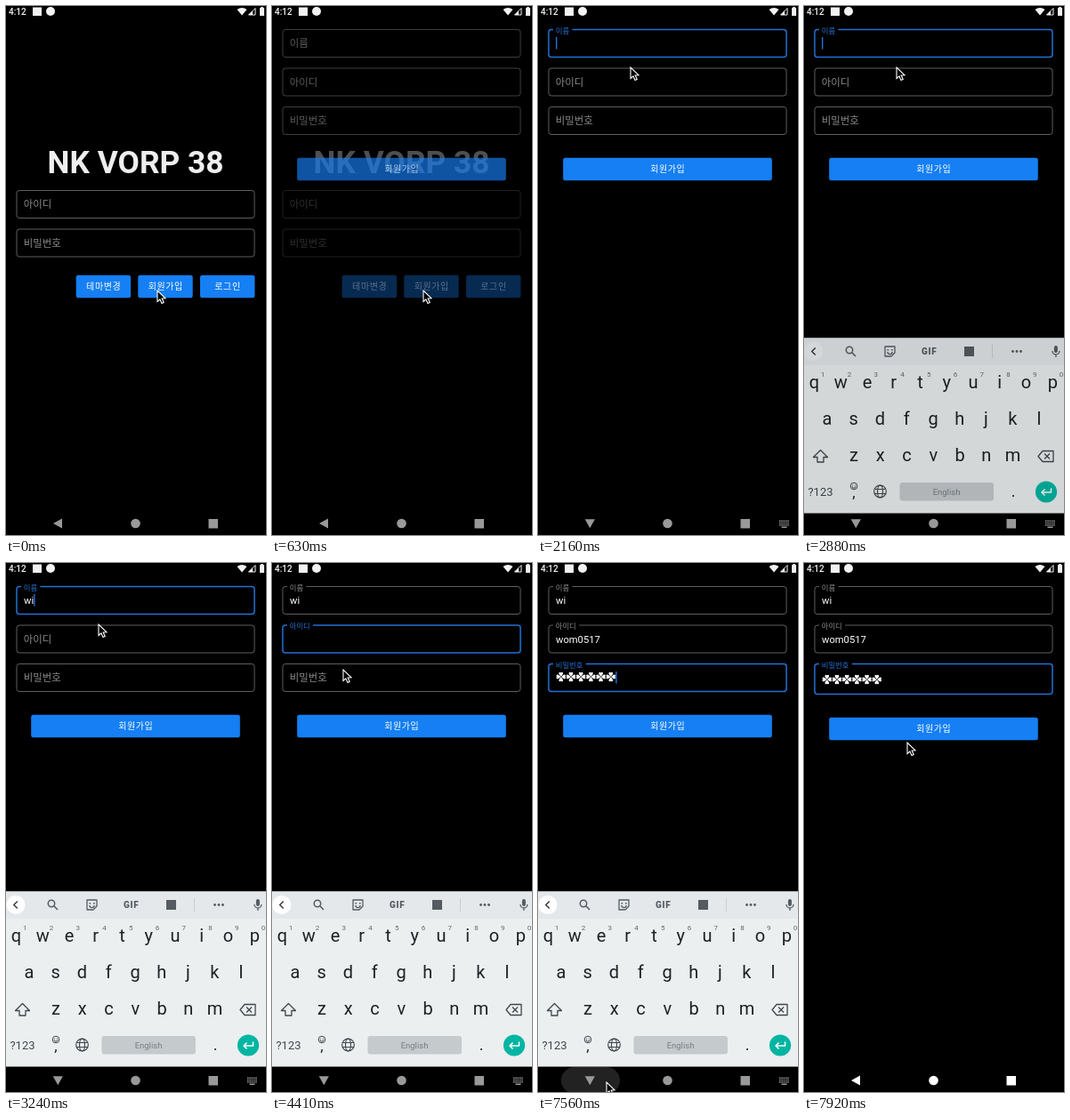
An HTML page with a canvas for the animation above (8000 ms loop, 292 by 595 pixels).

```html
<!DOCTYPE html>
<html lang="ko">
<head>
<meta charset="utf-8">
<title>Sign up</title>
<style>
html, body { margin: 0; width: 100%; height: 100%; overflow: hidden; background: #000; }
canvas { display: block; width: 292px; height: 595px; }
</style>
</head>
<body>
<canvas id="stage"></canvas>
<script>
const W = 292, H = 595, LOOP = 8000, STEP = 90;
const canvas = document.getElementById('stage');
const ctx = canvas.getContext('2d');
const dpr = window.devicePixelRatio || 1;
canvas.width = W * dpr;
canvas.height = H * dpr;

const FONT = 'Roboto, "Noto Sans CJK KR", "Noto Sans CJK", sans-serif';
const BLUE = '#2470d4', GREY = '#5e5e5e', HINT = '#8a8a8a';
const TITLE = 'NK VORP 38', NAME = 'wi', USER = 'wom0517';

const FOCUS = { name: 1350, user: 3690, pass: 5580 };
const NAME_KEYS = [3060, 3240];
const USER_KEYS = [4770, 4860, 4950, 5130, 5220, 5310, 5400];
const PASS_KEYS = [6390, 6570, 6660, 6840, 6930, 7110];
const CARET_STARTS = [1880, ...NAME_KEYS, 3780, ...USER_KEYS, FOCUS.pass, ...PASS_KEYS];
const KEYS_OPEN = 2880, KEYS_CLOSE = 7650, CLOSED = 7740;

// time, x, y of the pointer tip
const PATH = [
  [0, 170, 320], [630, 170, 320], [1170, 83, 44], [1530, 83, 44],
  [1710, 104, 69], [4050, 104, 69], [4410, 80, 120], [5490, 80, 120],
  [5670, 82, 130], [7200, 82, 130], [7470, 77, 584], [7650, 77, 584],
  [7920, 116, 202]
];

const clamp = v => Math.max(0, Math.min(1, v));
const prog = (t, a, b) => clamp((t - a) / (b - a));
const ease = p => p * p * (3 - 2 * p);
const mix = (a, b, p) => a + (b - a) * p;
const countUntil = (list, t) => list.filter(v => v <= t).length;

function text(str, x, y, size, color, align = 'left', weight = 400, spacing = 0) {
  ctx.font = `${weight} ${size}px ${FONT}`;
  ctx.letterSpacing = spacing + 'px';
  ctx.textAlign = align;
  ctx.fillStyle = color;
  ctx.fillText(str, x, y);
  const w = ctx.measureText(str).width;
  ctx.letterSpacing = '0px';
  return w;
}

function box(x, y, w, h, r) {
  ctx.beginPath();
  ctx.roundRect(x, y, w, h, r);
}

function disc(x, y, r, color) {
  ctx.fillStyle = color;
  ctx.beginPath();
  ctx.arc(x, y, r, 0, Math.PI * 2);
  ctx.fill();
}

function ring(x, y, r, color, width = 1) {
  ctx.strokeStyle = color;
  ctx.lineWidth = width;
  ctx.beginPath();
  ctx.arc(x, y, r, 0, Math.PI * 2);
  ctx.stroke();
}

function shape(points, close = true) {
  ctx.beginPath();
  points.forEach(([x, y], i) => i ? ctx.lineTo(x, y) : ctx.moveTo(x, y));
  if (close) ctx.closePath();
}

function line(points, color, width = 1.3) {
  ctx.strokeStyle = color;
  ctx.lineWidth = width;
  shape(points, false);
  ctx.stroke();
}

function button(label, x, y, w) {
  box(x, y, w, 25.4, 2.5);
  ctx.fillStyle = '#157ff3';
  ctx.fill();
  text(label, x + w / 2 + 0.3, y + 16.3, 10, '#fff', 'center', 500, 0.6);
}

// Outlined input; lift moves the label from the middle onto the border.
function field(label, y, lift = 0, focused = false, h = 31) {
  box(12, y + 0.5, 267, h, 3);
  ctx.strokeStyle = focused ? BLUE : GREY;
  ctx.lineWidth = focused ? 1.5 : 1;
  ctx.stroke();
  const size = mix(11.4, 8.4, lift);
  if (lift > 0) {
    ctx.font = `400 ${size}px ${FONT}`;
    ctx.fillStyle = '#000';
    ctx.fillRect(17, y - 2, (ctx.measureText(label).width + 6) * lift, 5);
  }
  text(label, 19.7, mix(y + 20, y + 4.5, lift), size, focused ? BLUE : HINT);
}

function caret(t, x, y) {
  const start = CARET_STARTS.filter(v => v <= t).pop();
  if (start === undefined || (t - start) % 1000 >= 500) return;
  ctx.fillStyle = BLUE;
  ctx.fillRect(x, y + 9, 1.4, 13.5);
}

function clover(x, y) {
  ctx.fillStyle = '#fff';
  for (let i = 0; i < 4; i++) {
    ctx.save();
    ctx.translate(x, y);
    ctx.rotate(i * Math.PI / 2);
    ctx.beginPath();
    ctx.moveTo(0, -0.2);
    ctx.bezierCurveTo(-0.9, -1.8, -2.8, -2.8, -2.3, -4.5);
    ctx.bezierCurveTo(-1.9, -5.7, -0.5, -5.5, 0, -4.4);
    ctx.bezierCurveTo(0.5, -5.5, 1.9, -5.7, 2.3, -4.5);
    ctx.bezierCurveTo(2.8, -2.8, 0.9, -1.8, 0, -0.2);
    ctx.fill();
    ctx.restore();
  }
}

function statusBar() {
  const c = '#f2f2f2';
  text('4:12', 3, 10, 10, c, 'left', 500);
  ctx.fillStyle = c;
  ctx.fillRect(30, 1.5, 10, 9.5);
  disc(50, 6, 5, c);
  ctx.fillStyle = c;
  ctx.beginPath();
  ctx.moveTo(265, 10.5);
  ctx.lineTo(259.5, 4);
  ctx.quadraticCurveTo(265, 0, 270.5, 4);
  ctx.fill();
  shape([[272.5, 10], [280, 10], [280, 2.5]]);
  ctx.strokeStyle = c;
  ctx.lineWidth = 1;
  ctx.stroke();
  shape([[272.5, 10], [277, 10], [277, 5.5]]);
  ctx.fill();
  ctx.fillRect(285, 2, 5, 9);
  ctx.fillRect(286.3, 1, 2.4, 1);
}

function navBar(t) {
  const c = t >= CLOSED ? '#fff' : '#999';
  const press = prog(t, 7470, 7560) * (1 - prog(t, 7650, 7830));
  if (press > 0) {
    ctx.globalAlpha = press;
    box(26, 567, 66, 30, 15);
    ctx.fillStyle = '#222';
    ctx.fill();
    ctx.globalAlpha = 1;
  }
  const closing = prog(t, KEYS_CLOSE, CLOSED);
  const turn = ease(prog(t, 1800, 2160)) * (1 - closing);
  ctx.save();
  ctx.translate(58.3, 582);
  ctx.rotate(-turn * Math.PI / 2);
  shape([[-5.3, 0], [4.7, -5.6], [4.7, 5.6]]);
  ctx.fillStyle = c;
  ctx.fill();
  ctx.restore();
  disc(145.5, 582, 5.3, c);
  ctx.fillStyle = c;
  ctx.fillRect(227.5, 577, 10.5, 10.5);

  ctx.globalAlpha = prog(t, 1800, 2160) * (1 - closing);
  ctx.fillStyle = '#999';
  for (let r = 0; r < 3; r++)
    for (let i = 0; i < 5; i++) ctx.fillRect(271 + i * 2.3, 578.5 + r * 2.3, 1.5, 1.5);
  ctx.fillRect(273.5, 585.5, 6, 1.5);
  ctx.globalAlpha = 1;
}

function toolbar(glow) {
  const c = '#545c62';
  ctx.fillStyle = '#e4e8eb';
  ctx.fillRect(0, 369.5, W, 30.5);
  disc(11, 384.5, 10.5, `rgba(255, 255, 255, ${glow})`);
  line([[12.8, 380.5], [8.8, 384.5], [12.8, 388.5]], '#30363a', 1.4);
  ring(51, 383, 3.7, c, 1.5);
  line([[53.8, 385.8], [58, 390]], c, 1.6);

  shape([[91, 379], [102, 379], [102, 386], [98, 390], [91, 390]]);
  ctx.strokeStyle = c;
  ctx.lineWidth = 1.3;
  ctx.lineJoin = 'round';
  ctx.stroke();
  ctx.fillStyle = c;
  ctx.fillRect(93.5, 382, 1.6, 1.6);
  ctx.fillRect(98, 382, 1.6, 1.6);
  ctx.beginPath();
  ctx.arc(96.5, 385, 2.6, 0, Math.PI);
  ctx.stroke();
  text('GIF', 140.7, 388, 10, c, 'center', 900, 0.7);
  ctx.fillStyle = c;
  ctx.fillRect(180, 379, 11, 11);
  ctx.fillStyle = '#c8cdd1';
  ctx.fillRect(211, 377, 1, 15);
  [234.5, 239, 243.5].forEach(x => disc(x, 384.5, 1.4, c));

  box(280.9, 378, 4, 8, 2);
  ctx.fillStyle = c;
  ctx.fill();
  ctx.beginPath();
  ctx.arc(282.9, 384, 4, 0, Math.PI);
  ctx.moveTo(282.9, 388);
  ctx.lineTo(282.9, 391);
  ctx.stroke();
}

function keyboard(t) {
  if (t < KEYS_OPEN || t >= CLOSED) return;
  const ink = '#1c2226', c = '#3f474c';
  const open = prog(t, KEYS_OPEN, KEYS_OPEN + STEP);
  const closing = t >= KEYS_CLOSE;
  ctx.save();
  ctx.globalAlpha = closing ? 0.5 : 1;
  ctx.translate(0, closing ? 18 : 4 * (1 - open));
  ctx.fillStyle = '#ebeff0';
  ctx.fillRect(0, 369.5, W, 197);
  toolbar(mix(0.3, 1, open));

  const rows = [['qwertyuiop', 11.5], ['asdfghjkl', 26], ['zxcvbnm', 56]];
  rows.forEach(([keys, x0], r) => {
    [...keys].forEach((k, i) => {
      const x = x0 + i * 29.75;
      text(k, x, 426 + r * 41, 20, ink, 'center');
      if (!r) text(String((i + 1) % 10), x + 9.7, 412.7, 8, '#626a6f', 'center');
    });
  });

  shape([[18.5, 495.5], [26.5, 503.5], [22, 503.5], [22, 509], [15, 509], [15, 503.5], [10.5, 503.5]]);
  ctx.strokeStyle = c;
  ctx.lineWidth = 1.3;
  ctx.stroke();
  shape([[263, 502.5], [268, 496.5], [280, 496.5], [280, 508.5], [268, 508.5]]);
  ctx.stroke();
  line([[270, 499.5], [276, 505.5]], c);
  line([[276, 499.5], [270, 505.5]], c);

  text('?123', 18.5, 547, 13, c, 'center');
  ring(56, 536, 3.8, c, 1);
  disc(54.6, 535, 0.6, c);
  disc(57.4, 535, 0.6, c);
  ctx.beginPath();
  ctx.arc(56, 536.3, 1.9, 0, Math.PI);
  ctx.stroke();
  text(',', 56, 549, 17, ink, 'center');

  ring(85.5, 542, 6.8, c, 1.2);
  ctx.beginPath();
  ctx.ellipse(85.5, 542, 3, 6.8, 0, 0, Math.PI * 2);
  ctx.stroke();
  line([[79.5, 539.5], [91.5, 539.5]], c, 1);
  line([[79.5, 544.5], [91.5, 544.5]], c, 1);

  box(107.5, 532, 105.5, 20.5, 3);
  ctx.fillStyle = '#c5cacd';
  ctx.fill();
  text('English', 160, 546, 9.5, '#757d82', 'center');
  text('.', 235, 548, 18, ink, 'center');
  disc(272, 542.5, 12.1, '#00b5a2');
  line([[277.5, 538.5], [277.5, 543], [267, 543]], '#fff', 1.5);
  line([[270.5, 539.5], [267, 543], [270.5, 546.5]], '#fff', 1.5);

  ctx.fillStyle = `rgba(0, 0, 0, ${0.1 * (1 - open)})`;
  ctx.fillRect(0, 369.5, W, 197);
  ctx.restore();
}

function login() {
  text(TITLE, 145.5, 188, 35.3, '#eee', 'center', 700);
  field('아이디', 207);
  field('비밀번호', 250.5);
  button('테마변경', 78.7, 302.8, 61.4);
  button('회원가입', 148.3, 302.8, 61.4);
  button('로그인', 218, 302.8, 61.4);
}

function signup(t) {
  const lift = start => ease(prog(t, start, start + 170));
  const onPass = t >= FOCUS.pass;
  const onUser = t >= FOCUS.user && !onPass;
  const onName = t >= FOCUS.name && t < FOCUS.user;
  const grow = t >= CLOSED ? 3 : 0;

  field('이름', 26, lift(FOCUS.name), onName);
  field('아이디', 69.5, lift(FOCUS.user), onUser);
  field('비밀번호', 113, lift(FOCUS.pass), onPass, 31 + grow);

  const nameW = text(NAME.slice(0, countUntil(NAME_KEYS, t)), 20, 46, 11.2, '#fff');
  const userW = text(USER.slice(0, countUntil(USER_KEYS, t)), 20, 89.5, 11.2, '#fff');
  const marks = countUntil(PASS_KEYS, t);
  for (let i = 0; i < marks; i++) clover(25.8 + i * 11.2, 128 + grow);

  if (onName) caret(t, 20 + nameW, 26);
  if (onUser) caret(t, 20 + userW, 69.5);
  if (onPass) caret(t, 20 + marks * 11.2, 113 + grow);
  button('회원가입', 28.2, 170.8 + grow, 234.6);
}

function pointer(t) {
  let i = 0;
  while (i < PATH.length - 2 && PATH[i + 1][0] <= t) i++;
  const [t0, x0, y0] = PATH[i], [t1, x1, y1] = PATH[i + 1];
  const p = ease(prog(t, t0, t1));
  const x = mix(x0, x1, p), y = mix(y0, y1, p);

  if ((t >= 90 && t < 360) || (t >= 1170 && t < 1440)) {
    ring(x + 1, y + 1, 18, '#d8d8d8', 1);
    ring(x + 1, y + 1, 16.2, '#a8a8a8', 1);
  }
  ctx.save();
  ctx.translate(x, y);
  shape([[0, 0], [0, 12.5], [2.9, 9.9], [5, 14.4], [7.2, 13.4], [5.2, 9], [9, 8.8]]);
  ctx.fillStyle = '#000';
  ctx.fill();
  ctx.strokeStyle = '#fff';
  ctx.lineWidth = 1.1;
  ctx.stroke();
  ctx.restore();
}

function draw(t) {
  ctx.setTransform(dpr, 0, 0, dpr, 0, 0);
  ctx.globalAlpha = 1;
  ctx.fillStyle = '#000';
  ctx.fillRect(0, 0, W, H);
  const swap = prog(t, 450, 720);
  if (swap < 1) {
    ctx.globalAlpha = 1 - swap;
    login();
  }
  if (swap > 0) {
    ctx.globalAlpha = swap;
    signup(t);
  }
  ctx.globalAlpha = 1;
  statusBar();
  keyboard(t);
  navBar(t);
  pointer(t);
}

const begin = performance.now();
function tick() {
  const t = (performance.now() - begin) % LOOP;
  draw(Math.floor(t / STEP) * STEP);
  requestAnimationFrame(tick);
}
tick();
</script>
</body>
</html>
```
